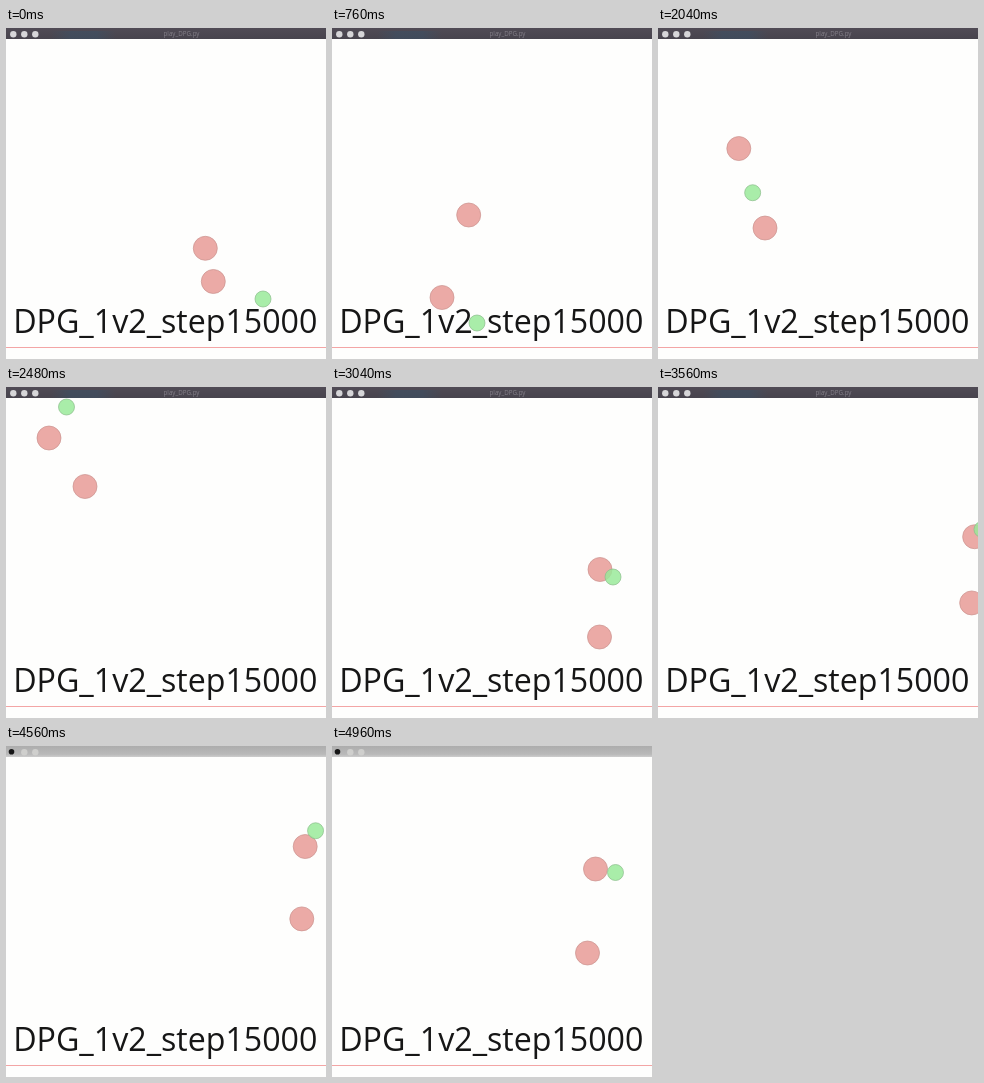
An HTML page that plays this animation: 320 by 331 pixels, repeating every 5000 ms.

```html
<!DOCTYPE html>
<html lang="en">
<head>
<meta charset="utf-8">
<title>play_DPG.py</title>
<style>
  html, body { margin: 0; width: 100%; height: 100%; overflow: hidden; background: #fefefd; }
  svg { display: block; width: 320px; height: 331px; }
  text { font-family: "Open Sans", "Noto Sans", sans-serif; }
</style>
</head>
<body>
<svg viewBox="0 0 320 331">
  <defs>
    <linearGradient id="dark" x2="0" y2="1">
      <stop offset="0" stop-color="#504b55"/>
      <stop offset="1" stop-color="#47444d"/>
    </linearGradient>
    <linearGradient id="light" x2="0" y2="1">
      <stop offset="0" stop-color="#adadad"/>
      <stop offset=".75" stop-color="#b9b9b9"/>
      <stop offset="1" stop-color="#cdcdcd"/>
    </linearGradient>
    <linearGradient id="tint">
      <stop offset="0" stop-color="#3d5064" stop-opacity="0"/>
      <stop offset=".3" stop-color="#3d5064" stop-opacity=".6"/>
      <stop offset=".7" stop-color="#3d5064" stop-opacity=".6"/>
      <stop offset="1" stop-color="#3d5064" stop-opacity="0"/>
    </linearGradient>
  </defs>
  <rect width="320" height="331" fill="#fefefd"/>
  <path d="M0 319.5H320" stroke="#f3a5a5"/>
  <g stroke-width=".7">
    <g fill="#ebaaa6" stroke="#cb938f">
      <circle id="near" r="12"/>
      <circle id="far" r="12"/>
    </g>
    <circle id="prey" r="8" fill="#98ea98" fill-opacity=".84" stroke="#8cbc8c"/>
  </g>
  <text x="7.2" y="305" font-size="32.15" fill="#161616">DPG_1v2_step15000</text>
  <rect width="320" height="11" fill="url(#dark)"/>
  <rect x="45" y="3" width="65" height="8" fill="url(#tint)"/>
  <text x="175.5" y="7.8" font-size="6.2" text-anchor="middle" fill="#85818a">play_DPG.py</text>
  <g fill="#d6d6d8">
    <circle cx="7.3" cy="6.3" r="3.2"/>
    <circle cx="18.3" cy="6.3" r="3.2"/>
    <circle cx="29.3" cy="6.3" r="3.2"/>
  </g>
  <g id="menu">
    <rect width="320" height="11" fill="url(#light)"/>
    <circle cx="18.3" cy="6.3" r="3.2" fill="#cfcfcd"/>
    <circle cx="29.3" cy="6.3" r="3.2" fill="#cfcfcd"/>
    <circle cx="5.5" cy="5.7" r="2.8" fill="#161616"/>
  </g>
</svg>
<script>
  const LOOP = 5000, STEP = 40, MENU_AT = 3560, MENU_FADE = 160;
  const $ = id => document.getElementById(id);

  // Each ball steers through one turning point per time.
  const times = [0, 760, 1520, 2480, 3040, 4160, 4960];
  const balls = {
    prey: { x: [257, 145, 172, 60.5, 281, 325, 283.5],
            y: [271, 295, 358, 20, 190, 65, 126.5] },
    near: { x: [199.3, 136.7, 163.3, 43, 268, 321, 263.5],
            y: [220.3, 187, 222, 51, 182.5, 92, 123] },
    far:  { x: [207.3, 110, 167, 79, 267.5, 321, 255.5],
            y: [253.5, 269.5, 337, 99.5, 250, 156, 207] }
  };

  // Smooth curve through the points, with slopes from their neighbours.
  function curve(v, t) {
    const last = times.length - 1;
    let i = 0;
    while (i < last - 1 && t > times[i + 1]) i++;
    const span = times[i + 1] - times[i], u = (t - times[i]) / span;
    const slope = k => {
      const a = Math.max(0, k - 1), b = Math.min(last, k + 1);
      return (v[b] - v[a]) / (times[b] - times[a]) * span;
    };
    const d = v[i + 1] - v[i], m = slope(i), n = slope(i + 1);
    return v[i] + u * (m + u * (3 * d - 2 * m - n + u * (m + n - 2 * d)));
  }

  function draw(t) {
    for (const id in balls) {
      $(id).setAttribute("cx", curve(balls[id].x, t).toFixed(2));
      $(id).setAttribute("cy", curve(balls[id].y, t).toFixed(2));
    }
    const fade = (t - MENU_AT) / MENU_FADE;
    $("menu").setAttribute("opacity", Math.max(0, Math.min(1, fade)));
  }

  const start = performance.now();
  function tick() {
    const t = (performance.now() - start) % LOOP;
    draw(Math.floor(t / STEP) * STEP);
    requestAnimationFrame(tick);
  }
  tick();
</script>
</body>
</html>
```
